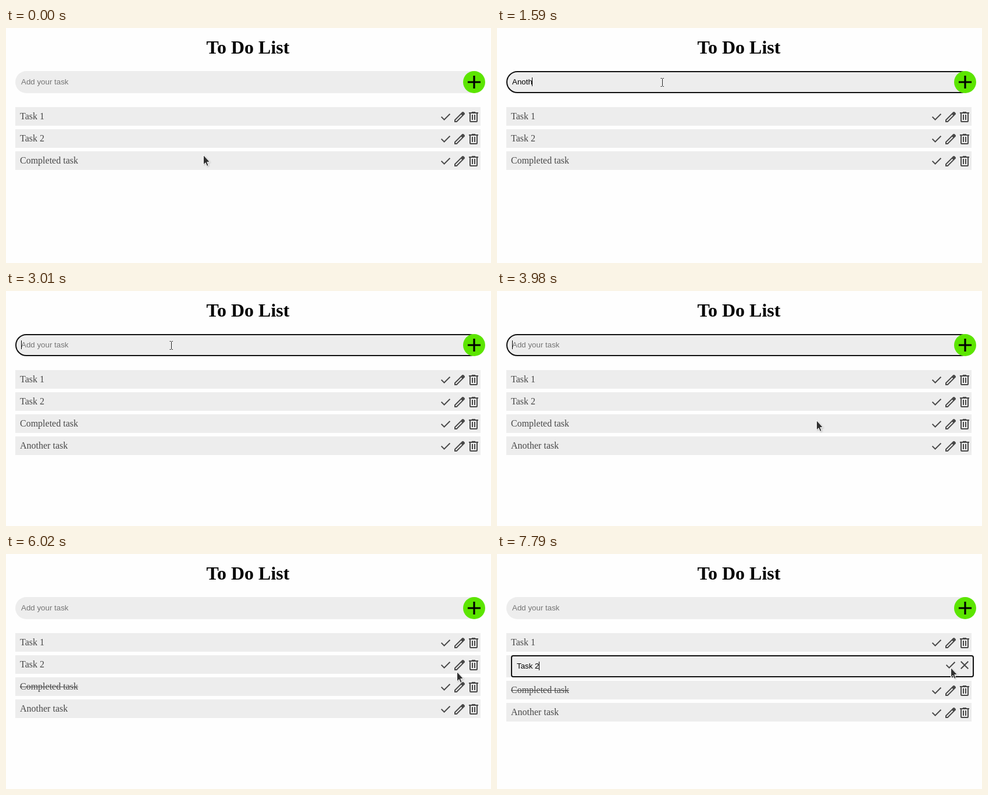
An HTML page for the animation above (8000 ms loop, 834 by 404 pixels).

```html
<!DOCTYPE html>
<html lang="en">
<head>
<meta charset="utf-8">
<title>To Do List</title>
<style>
  html, body { margin: 0; width: 100%; height: 100%; overflow: hidden; background: #fefefe; }
  body { position: relative; }
  body * { position: absolute; box-sizing: border-box; white-space: pre; }
  h1 { left: 16px; top: 15px; width: 800px; margin: 0; text-align: center; color: #000;
       font: bold 32px/36px "Liberation Serif", serif; }
  .field { background: #ededed; }
  .field.focus { border: 2px solid #101010; }
  #add { left: 16px; top: 74px; width: 800px; height: 38px; border-radius: 19px; }
  #edit { left: 24px; top: 174px; width: 796px; height: 38px; border-radius: 4px; }
  .value { font: 13.333px/15px "Liberation Sans", sans-serif; color: #000; }
  .value.empty { color: #757575; }
  .caret { width: 1px; height: 15px; background: #000; }
  #addValue { left: 26px; }
  #editValue { left: 34px; }
  #addValue, #addCaret { top: 85px; }
  #editValue, #editCaret { top: 185px; }
  #plus { left: 786px; top: 74px; width: 38px; height: 38px; border-radius: 50%; background: #5ce500; }
  .row { left: 16px; width: 800px; height: 32px; background: #ededed; color: #484848;
         font: 16px/17px "Liberation Serif", serif; }
  .row span { left: 8px; top: 7px; }
  .row.done span { text-decoration: line-through; }
  svg { overflow: visible; left: 0; top: 0; }
  .icon { width: 24px; height: 24px; fill: #484848; }
  #plus svg { width: 38px; height: 38px; }
  #arrow { filter: drop-shadow(1px 1px 1px #0003); }
  #beam { filter: drop-shadow(0 0 1px #fff); }
</style>
</head>
<body>
<h1>To Do List</h1>
<div id="add" class="field"></div>
<div id="addValue" class="value"></div>
<div id="addCaret" class="caret"></div>
<div id="plus"><svg viewBox="0 0 24 24"><path d="M11 13H5v-2h6V5h2v6h6v2h-6v6h-2z"/></svg></div>
<div id="rows"></div>
<div id="editor">
  <div id="edit" class="field focus"></div>
  <div id="editValue" class="value">Task 2</div>
  <div id="editCaret" class="caret"></div>
</div>
<svg id="arrow" width="12" height="20">
  <path d="M.5 .5V17L4.1 13.7 6.6 19.5 9.2 18.4 6.8 12.6H11.7Z" fill="#303030" stroke="#fff"/>
</svg>
<svg id="beam" width="7" height="17">
  <path d="M-2.5-6.5H-.5L.5-5.5 1.5-6.5H3M.5-5.5V6.5M-2.5 7.5H-.5L.5 6.5 1.5 7.5H3" fill="none" stroke="#222"/>
</svg>
<script>
const LOOP = 8000, TICK = 88.5, BLINK = 600, KEY_GAP = 135.4;
const FOCUS = 600, TYPE = 1040, SUBMIT = 2670, ADDED = 2990, BLUR = 5380, DONE = 5470, EDIT = 6540;
const TEXT = "Another task";

// Pointer key points: time, x, y
const POINTER = [
  [60, 339, 217.5], [390, 284, 93],
  [3455, 284, 93], [3800, 418, 124], [3980, 547, 222], [4160, 656, 223],
  [4340, 656, 223], [4870, 738, 222.5], [5130, 760, 229],
  [5760, 760, 229], [6020, 775, 202], [6380, 780, 195]
];

const ICONS = {
  check: "m9.55 18-5.7-5.7 1.425-1.425L9.55 15.15l9.175-9.175L20.15 7.4z",
  pencil: "M5 19h1.425L16.2 9.225 14.775 7.8 5 17.575zm-2 2v-4.25L16.2 3.575q.6-.575 1.425-.575t1.425.6L20.425 5q.575.55.575 1.4t-.575 1.425L7.25 21z",
  trash: "M7 21q-2 0-2-2V6H4V4h5V3h6v1h5v2h-1v13q0 2-2 2zM17 6H7v13h10zM9 17h2V8H9zm4 0h2V8h-2z",
  close: "M6.4 19 5 17.6l5.6-5.6L5 6.4 6.4 5l5.6 5.6L17.6 5 19 6.4 13.4 12l5.6 5.6-1.4 1.4-5.6-5.6z"
};

const $ = id => document.getElementById(id);
const clamp = (v, lo, hi) => Math.min(hi, Math.max(lo, v));
const show = (el, on) => { el.style.visibility = on ? "visible" : "hidden"; };
const blink = (t, since) => Math.floor(Math.max(0, t - since) / BLINK) % 2 === 0;

// Icons sit side by side, flush with the right end of a row.
const icons = (names, right, top) => names.map((name, i) =>
  `<svg class="icon" viewBox="0 0 24 24" style="left:${right - 24 * (names.length - i)}px;top:${top}px">` +
  `<path d="${ICONS[name]}"/></svg>`).join("");

const rows = ["Task 1", "Task 2", "Completed task", TEXT].map(label => {
  const row = document.createElement("div");
  row.className = "row";
  row.innerHTML = `<span>${label}</span>` + icons(["check", "pencil", "trash"], 800, 4.5);
  $("rows").append(row);
  return row;
});
$("editor").insertAdjacentHTML("beforeend", icons(["check", "close"], 816, 178.5));

function pointerAt(t) {
  const next = POINTER.findIndex(p => p[0] > t);
  if (next <= 0) return POINTER.at(next).slice(1);
  const [t0, x0, y0] = POINTER[next - 1], [t1, x1, y1] = POINTER[next];
  const u = (t - t0) / (t1 - t0);
  return [x0 + (x1 - x0) * u, y0 + (y1 - y0) * u];
}

function placeCaret(caret, value, on) {
  const box = value.getBoundingClientRect();
  const empty = value.classList.contains("empty");
  caret.style.left = Math.floor(empty ? box.left : box.right) + "px";
  show(caret, on);
}

function render(time) {
  const t = Math.floor((time + 10) / TICK) * TICK;
  const focused = t >= FOCUS && t < BLUR;
  const editing = t >= EDIT;

  const count = t < ADDED ? clamp(1 + Math.floor((t - TYPE) / KEY_GAP), 0, TEXT.length) : 0;
  const value = $("addValue");
  value.textContent = TEXT.slice(0, count) || "Add your task";
  value.classList.toggle("empty", !count);
  $("add").classList.toggle("focus", focused);
  placeCaret($("addCaret"), value, focused && blink(t, SUBMIT));

  rows.forEach((row, i) => {
    row.style.top = 136 + 38 * i + (editing && i > 1 ? 6 : 0) + "px";
    row.style.height = editing && i === 1 ? "38px" : "32px";
  });
  for (const part of rows[1].children) part.style.display = editing ? "none" : "";
  rows[2].classList.toggle("done", t >= DONE);
  show(rows[3], t >= ADDED);
  show($("editor"), editing);
  placeCaret($("editCaret"), $("editValue"), editing && blink(t, EDIT));

  const [x, y] = pointerAt(t).map(Math.round);
  const overField = y >= 74 && y < 112;
  show($("arrow"), !overField);
  show($("beam"), overField);
  for (const id of ["arrow", "beam"]) $(id).style.transform = `translate(${x}px, ${y}px)`;
}

const start = performance.now();
function tick() {
  render((performance.now() - start) % LOOP);
  requestAnimationFrame(tick);
}
tick();
</script>
</body>
</html>
```
